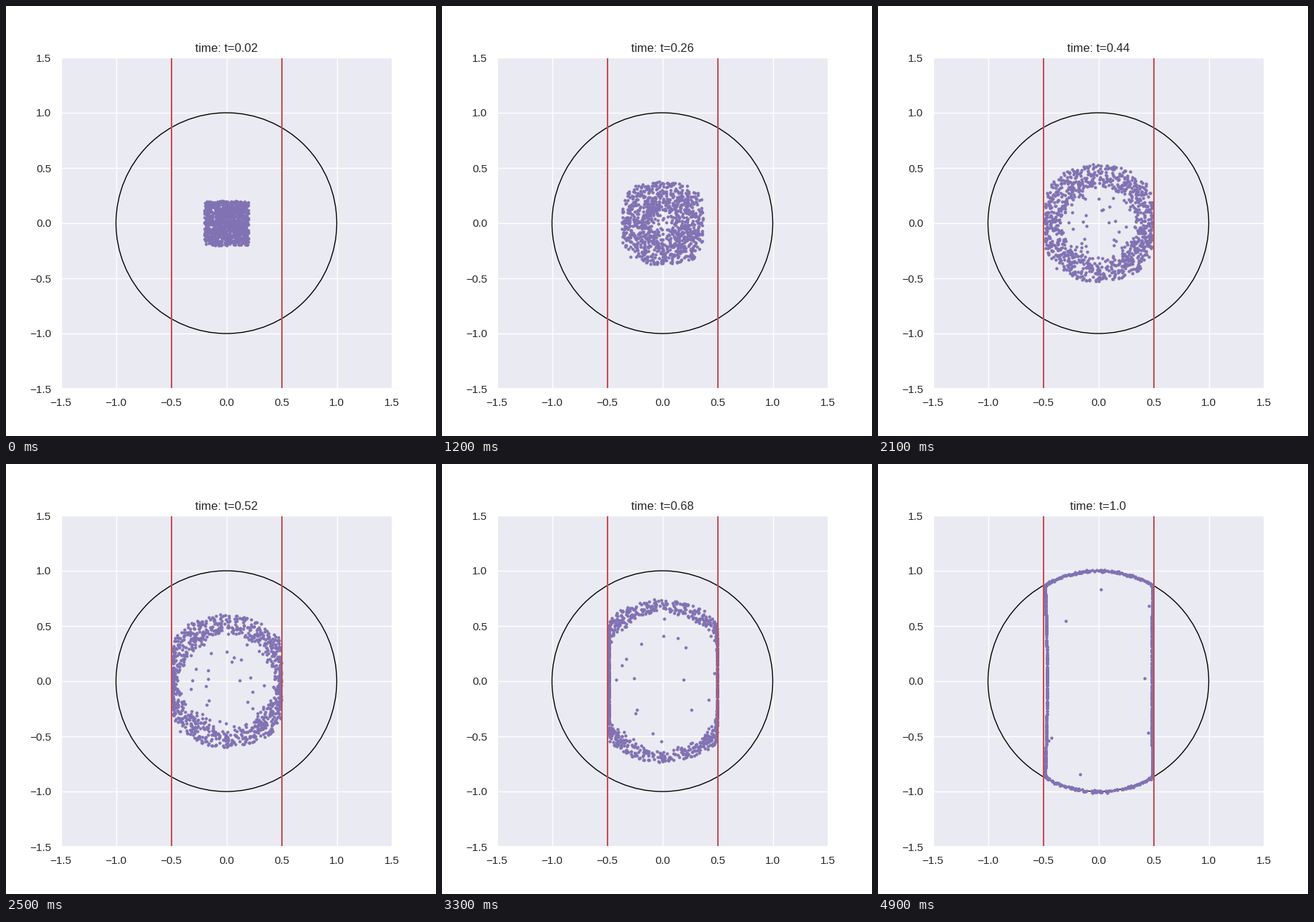
A matplotlib script that plays this animation: 600x600 px, repeating every 5000 ms.

```python
import numpy as np
import matplotlib.pyplot as plt
from matplotlib.animation import FuncAnimation

FRAMES, INTERVAL = 50, 100
DT = 1 / FRAMES
COUNT, SLOW = 1000, 32
HALF = 0.2                      # half side of the starting square
LEFT, RIGHT, SOFT = -0.484, 0.494, 0.02

plt.rcParams.update({
    "font.family": "Liberation Sans",
    "text.color": ".15",
    "xtick.color": ".15",
    "ytick.color": ".15",
    "axes.facecolor": "#EAEAF2",
    "axes.edgecolor": "white",
    "axes.linewidth": 1.25,
    "axes.axisbelow": True,
    "grid.color": "white",
    "grid.linewidth": 1,
    "lines.solid_capstyle": "round",
})

rng = np.random.default_rng(7)
angles = np.linspace(0, 2 * np.pi, 480, endpoint=False)
ring = np.column_stack([np.cos(angles), np.sin(angles)])


def velocity(pos, t):
    """Mean drift towards the circle, over the targets reachable from the square."""
    log_w = 0
    for axis in range(2):
        start = (pos[:, axis, None] - t * ring[:, axis]) / (1 - t)
        log_w = log_w - np.maximum(np.abs(start) - HALF, 0) / 0.015
    weight = np.exp(log_w - log_w.max(axis=1, keepdims=True))
    mean = weight @ ring / weight.sum(axis=1, keepdims=True)
    return (mean - pos) / (1 - t)


def free_flow():
    """Positions at t = DT, 2 DT, ..., 1 by the midpoint rule."""
    pos = rng.uniform(-HALF, HALF, (COUNT, 2))
    states = [pos]
    for i in range(1, FRAMES):
        t = i * DT
        middle = pos + DT / 2 * velocity(pos, t)
        pos = pos + DT * velocity(middle, t + DT / 2)
        states.append(pos)
    return states


def round_off(pos, t):
    """Widen the sides and trim the corners while the square opens up."""
    theta = np.arctan2(pos[:, 1], pos[:, 0])
    bump = 6.75 * t * (1 - t) ** 2
    return pos * (1 + bump * (0.02 + 0.045 * np.cos(4 * theta)))[:, None]


def hold_back(pos, t):
    """Jitter every point and let the slow ones trail inside the ring."""
    lag = depth * np.clip(1 - (t / life) ** 4, 0, 1)
    return pos * (1 - lag + jitter * t)[:, None]


def constrain(pos, t):
    """Soft walls near the red lines, bowing slightly inwards at the end."""
    x, y = pos.T
    x = RIGHT - SOFT * np.logaddexp(0, (RIGHT - x) / SOFT)
    x = LEFT + SOFT * np.logaddexp(0, (x - LEFT) / SOFT)
    bow = np.clip(1 - (y / 0.87) ** 2, 0, 1) * max(0, (t - 0.7) / 0.3) ** 2
    x = x + bow * np.where(x < 0, 0.019, -0.013)
    return np.column_stack([x, y])


states = free_flow()
jitter = rng.normal(0, 0.005, COUNT)
depth, life = np.zeros(COUNT), np.ones(COUNT)
depth[:SLOW] = rng.uniform(0.15, 0.9, SLOW)
life[:SLOW] = 0.5 + rng.exponential(0.3, SLOW)

fig, ax = plt.subplots(figsize=(6, 6), dpi=100)
ax.set_aspect("equal")
ax.set(xlim=(-1.5, 1.5), ylim=(-1.5, 1.5))
ticks = np.arange(-1.5, 1.6, 0.5)
ax.set_xticks(ticks)
ax.set_yticks(ticks)
ax.tick_params(length=6, labelsize=11, bottom=False, left=False)
ax.grid(True)
ax.add_patch(plt.Circle((0, 0), 1, fill=False, edgecolor="black", linewidth=1))
dots = ax.scatter([], [], s=10, color="#8172B3", linewidths=0)
for wall in (-0.5, 0.5):
    ax.axvline(wall, color="#C44E52", linewidth=1.5)
title = ax.set_title("", fontsize=12)


def update(i):
    t = (i + 1) * DT
    pos = hold_back(round_off(states[i], t), t)
    dots.set_offsets(constrain(pos, t))
    title.set_text(f"time: t={round(t, 2)}")
    return dots, title


anim = FuncAnimation(fig, update, frames=FRAMES, interval=INTERVAL,
                     repeat=True, repeat_delay=0, blit=False)
plt.show()
```
